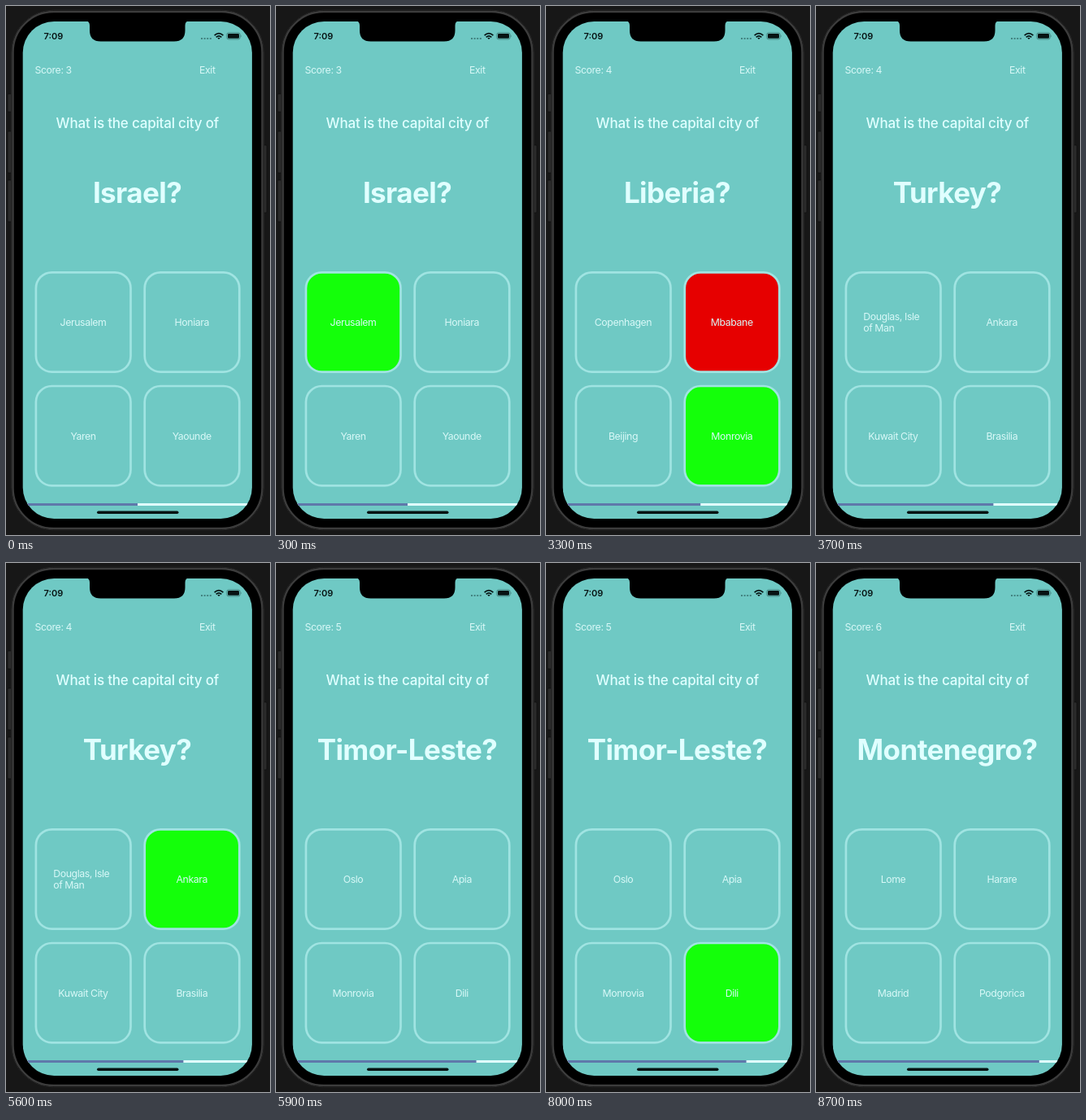
An HTML page that plays this animation: 325x650 px, repeating every 9700 ms.

```html
<!DOCTYPE html>
<html lang="en">
<head>
<meta charset="utf-8">
<title>Capital city quiz</title>
<style>
  html, body { margin: 0; width: 100%; height: 100%; overflow: hidden; background: #171717; }
  svg { display: block; width: 325px; height: 650px; font-family: Inter, "Liberation Sans", sans-serif; }
  text { fill: #d8f8f7; font-size: 12.3px; letter-spacing: -.4px; white-space: pre; }
  .mid { text-anchor: middle; }
  #country { font-size: 35px; font-weight: 700; letter-spacing: -.6px; fill: #e0ffff; }
  #ask { font-size: 17px; font-weight: 500; letter-spacing: -.2px; fill: #e0ffff; }
  #clock { font-size: 11px; font-weight: 600; letter-spacing: 0; fill: #071313; }
</style>
</head>
<body>
<svg viewBox="0 0 325 650">
  <defs>
    <clipPath id="screen"><rect x="20.700" y="19" width="282.200" height="611" rx="38.500"/></clipPath>
  </defs>

  <!-- phone body and side keys -->
  <g fill="#2b2b2b" stroke="#0c0c0c" stroke-width=".6">
    <rect x="2" y="108" width="6" height="22" rx="1"/>
    <rect x="2" y="154" width="6" height="51" rx="1"/>
    <rect x="2" y="214" width="6" height="51" rx="1"/>
    <rect x="316" y="171" width="5" height="83" rx="1"/>
  </g>
  <rect x="6.500" y="5" width="311" height="639" rx="52" fill="#000" stroke="#252525"/>
  <rect x="8.500" y="7" width="307" height="635" rx="50" fill="none" stroke="#3c3c3c" stroke-width="2.400"/>

  <g clip-path="url(#screen)">
    <rect x="20" y="19" width="284" height="611" fill="#6fc9c4"/>
    <rect x="21" y="611" width="282" height="3" fill="#e0ffff"/>
    <rect id="bar" x="21" y="611" height="3" fill="#5f78aa"/>
  </g>
  <path d="M98.500 18 Q103 19 103 24 V30 Q103 43.500 116.500 43.500 H207 Q220.500 43.500 220.500 30 V24 Q220.500 19 225 18Z"/>
  <rect x="112" y="620.500" width="100.500" height="3.600" rx="1.800" fill="#071313"/>

  <!-- status icons -->
  <text id="clock" x="46.500" y="41">7:09</text>
  <path d="M240 40h13" stroke="#438481" stroke-width="2" stroke-dasharray="2 1.600"/>
  <g fill="none" stroke="#071313" stroke-width="1.700">
    <path d="M256.600 36.200 Q262 31.200 267.400 36.200M258.700 38.300 Q262 35.400 265.300 38.300"/>
    <path d="M260.300 39.300 L262 41 L263.700 39.300 Q262 38 260.300 39.300Z" fill="#071313" stroke="none"/>
  </g>
  <rect x="271.800" y="32.900" width="16.400" height="8" rx="2.300" fill="none" stroke="#3c7572" stroke-width=".8"/>
  <rect x="273" y="34.100" width="14" height="5.600" rx="1.300" fill="#071313"/>
  <path d="M289.300 35.500 q1.400 1.400 0 2.800z" fill="#3c7572"/>

  <text id="score" x="35.500" y="83"></text>
  <text x="238" y="83">Exit</text>
  <text id="ask" class="mid" x="161.800" y="150">What is the capital city of</text>
  <text id="country" class="mid" x="161.500" y="242.300"></text>
  <g id="answers"></g>
</svg>
<script>
const LOOP = 9700, GREEN = '#14ff0a', RED = '#e60000';
// at: question appears; reveal: answers are coloured; right / wrong: tile indexes
const rounds = [
  { at: 0, reveal: 300, score: 3, country: 'Israel', right: 0,
    answers: ['Jerusalem', 'Honiara', 'Yaren', 'Yaounde'] },
  { at: 600, reveal: 3300, score: 4, country: 'Liberia', right: 3, wrong: 1,
    answers: ['Copenhagen', 'Mbabane', 'Beijing', 'Monrovia'] },
  { at: 3600, reveal: 5600, score: 4, country: 'Turkey', right: 1,
    answers: ['Douglas, Isle\nof Man', 'Ankara', 'Kuwait City', 'Brasilia'] },
  { at: 5900, reveal: 8000, score: 5, country: 'Timor-Leste', right: 3,
    answers: ['Oslo', 'Apia', 'Monrovia', 'Dili'] },
  { at: 8300, reveal: LOOP, score: 6, country: 'Montenegro',
    answers: ['Lome', 'Harare', 'Madrid', 'Podgorica'] }
];
const $ = id => document.getElementById(id);

function label(text, x, y) {
  const lines = text.split('\n');
  if (lines.length === 1) return `<text class="mid" x="${x - .2}" y="${y + 4.3}">${text}</text>`;
  return lines.map((line, i) => `<text x="${x - 37}" y="${y - 2.8 + i * 14.5}">${line}</text>`).join('');
}

function tile(text, i, fill) {
  const x = 36.9 + i % 2 * 133.8, y = 327.3 + (i >> 1) * 139.7;
  return `<rect x="${x}" y="${y}" width="116.6" height="122.3" rx="19.5" fill="${fill}"
    stroke="#a0e4e2" stroke-width="2.7"/>` + label(text, x + 58.3, y + 61.2);
}

let shown;
function frame(now) {
  const t = now % LOOP;
  const n = rounds.findLastIndex(r => t >= r.at);
  const round = rounds[n], open = t >= round.reveal;
  const state = n + '/' + open;
  if (state !== shown) {
    shown = state;
    $('score').textContent = 'Score: ' + round.score;
    $('country').textContent = round.country + '?';
    $('bar').setAttribute('width', 282 * (.5 + n / 10));
    $('answers').innerHTML = round.answers.map((text, i) =>
      tile(text, i, open && i === round.right ? GREEN : open && i === round.wrong ? RED : 'none')).join('');
  }
  requestAnimationFrame(frame);
}
frame(performance.now());
</script>
</body>
</html>
```
